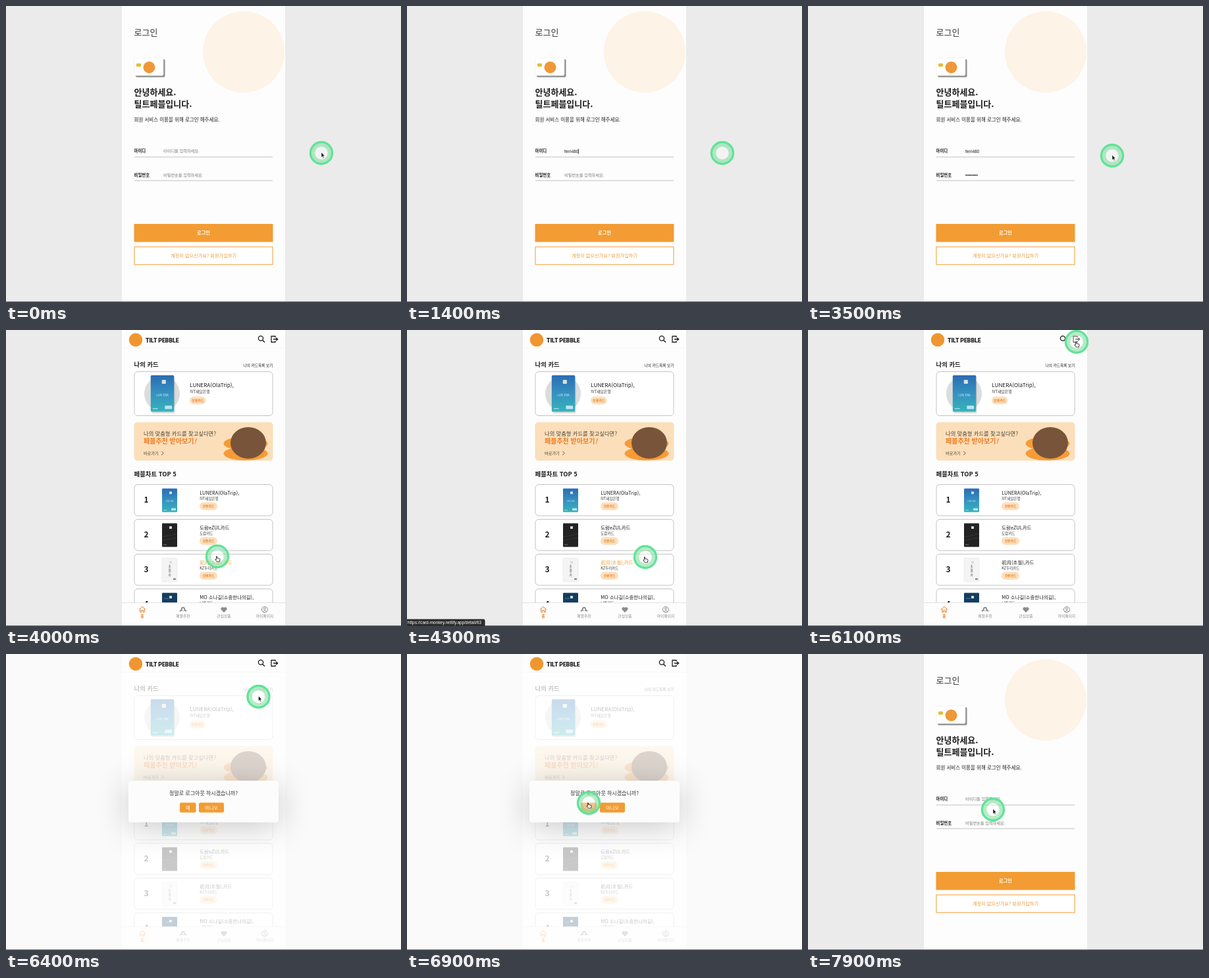
An HTML page that plays this animation: 600 by 451 pixels, repeating every 8 s.

```html
<!DOCTYPE html>
<html lang="ko">
<head>
<meta charset="utf-8">
<style>
html, body { margin: 0; width: 100%; height: 100%; overflow: hidden; background: #ebebeb; }
svg { display: block; width: 600px; height: 451px; }
text { font-family: "Noto Sans CJK KR", "Noto Sans CJK JP", sans-serif; white-space: pre; }
.latin { font-family: "Liberation Sans", sans-serif; }
.brand { font-family: Roboto, sans-serif; }
#modal > rect:first-child { filter: drop-shadow(0 7px 24px rgba(0, 0, 0, .22)); }
</style>
</head>
<body>
<svg id="stage" viewBox="0 0 600 451"></svg>
<script>
const ORANGE = '#f29c33', DEEP = '#f07a20', INK = '#1c1c1c';

const text = (x, y, size, str, fill = INK, weight = 400, more = '') =>
  `<text x="${x}" y="${y}" font-size="${size}" fill="${fill}" font-weight="${weight}" ${more}>${str}</text>`;
const rect = (x, y, w, h, fill, more = '') =>
  `<rect x="${x}" y="${y}" width="${w}" height="${h}" fill="${fill}" ${more}/>`;
const disc = (x, y, r, fill, more = '') =>
  `<circle cx="${x}" cy="${y}" r="${r}" fill="${fill}" ${more}/>`;
const line = (d, stroke, width = 1, more = '') =>
  `<path d="${d}" fill="none" stroke="${stroke}" stroke-width="${width}" ${more}/>`;
const middle = 'text-anchor="middle"';
const frame = (y, h) => rect(195, y, 210, h, '#fff', 'rx="5" stroke="#bdbdbd" stroke-width=".9"');

function login() {
  return disc(361, 70, 62, '#fdf3e6', 'clip-path="url(#column)"') +
    text(194.5, 44.5, 13, '로그인', '#333', 300) +
    rect(197, 81, 44.5, 27.5, '#8d8d8d', 'rx="2"') +
    rect(195, 79, 44, 27, '#fff', 'rx="2" stroke="#eee" stroke-width=".6"') +
    rect(198, 87.5, 7, 5, '#e9b93c', 'rx="1"') +
    disc(217.5, 93.5, 9, '#ef9838') +
    text(194.5, 135.5, 13, '안녕하세요.', INK, 700) +
    text(194.5, 153.5, 13, '틸트페블입니다.', INK, 700) +
    text(194.5, 176, 7.5, '회원 서비스 이용을 위해 로그인 해주세요.', INK, 500) +
    text(194.5, 223.3, 6.4, '아이디', INK, 700) +
    text(194.5, 259.5, 6.4, '비밀번호', INK, 700) +
    text(239, 223.3, 6.2, '아이디를 입력하세요.', '#777', 400, 'id="idHint"') +
    text(239, 259.5, 6.2, '비밀번호를 입력하세요.', '#777', 400, 'id="pwHint"') +
    text(239, 223.6, 6.3, '', INK, 400, 'id="idText" class="latin"') +
    '<g id="dots"></g>' + rect(0, 0, .7, 8, '#111', 'id="caret"') +
    rect(195, 229.6, 210, .9, '#b9b9b9') + rect(195, 265.6, 210, .9, '#b9b9b9') +
    rect(194.5, 332, 211, 27.5, ORANGE) +
    text(300, 348, 7.2, '로그인', '#fff', 700, middle) +
    rect(195, 367, 210, 27, '#fff', `stroke="${ORANGE}"`) +
    text(300, 382.7, 7.2, '계정이 없으신가요? 회원가입하기', ORANGE, 500, middle);
}

// Payment card picture; the unit size is 23 by 36
function card(x, y, k, kind) {
  const g = [
    rect(0, 0, 23, 36, 'url(#sky)', 'rx="1"') +
      text(11.5, 20.5, 3, 'LUN ERA', '#cfeaf5', 400, middle) +
      rect(14, 30, 7, 3.5, '#bfe3ee', 'rx=".5"') + rect(2, 32.5, 5, 1, '#9fd6df'),
    rect(0, 0, 23, 36, '#232323', 'rx="1"') + line('M0 21L23 16M0 26L23 22', '#3a3a3a', .8) +
      rect(2, 32, 5, 1, '#777'),
    rect(0, 0, 23, 36, '#f4f4f4', 'rx="1" stroke="#e2e2e2" stroke-width=".5"') +
      ['초', '월', '카'].map((c, i) => text(11.5, 14 + i * 6.5, 4.6, c, '#444', 400, middle)).join('') +
      rect(17, 31, 4, 2, '#777'),
    rect(0, 0, 23, 36, '#123d61', 'rx="1"') + rect(3, 8, 7, 1, '#4f7d9f')
  ][kind];
  return `<g transform="translate(${x} ${y}) scale(${k})">${g}${rect(11, 4.5, 4, 4, '#d9dfdc', 'rx=".7"')}</g>`;
}

const pill = (x, y, w, size) => rect(x, y, w, 12, '#fbe0bd', 'rx="6"') +
  text(x + w / 2, y + 7.8, size, '신용카드', DEEP, 700, middle);

const rows = [
  ['LUNERA(OlaTrip),', 'IVT새담은행', 20],
  ['도람eZUL카드', '도람카드', 14],
  ['初月(초월),카드', 'KZ두리카드', 63],
  ['MO 소나길(소중한나의길),', '너른카드', 35]
];
const rowTop = i => 235.5 + i * 53;

function row([name, bank], i) {
  const y = rowTop(i);
  return frame(y, 47.5) + text(209.5, y + 27, 12, i + 1, INK, 700) + card(237, y + 6, 1, i) +
    text(294.3, y + 15.5, 7.4, name, INK, 500, 'class="name"') +
    text(294.3, y + 23.6, 5.5, bank, '#333') + pill(294, y + 27, 27, 4.8);
}

function nav() {
  const labels = ['홈', '페블추천', '관심상품', '마이페이지'];
  const grey = '#8c8c8c';
  return rect(176, 415.5, 248, 35, '#fdfdfd') + rect(176, 415, 248, .8, '#ddd') +
    labels.map((s, i) => text(207 + i * 62, 437.6, 5.8, s, i ? grey : DEEP, i ? 400 : 700, middle)).join('') +
    line('M202.5 425.5L207 421.5L211.5 425.5M203.7 425V430H205.7V427H208.3V430H210.3V425', DEEP, 1) +
    line('M264.5 429Q265 426 267 427Q266 423 269 423Q272 423 271 427Q273 426 273.5 429', grey, 1.8) +
    `<path d="M331 430.5L327 426.4A2.5 2.5 0 0 1 331 423.3A2.5 2.5 0 0 1 335 426.4Z" fill="${grey}"/>` +
    disc(393, 426, 4.5, 'none', `stroke="${grey}"`) + disc(393, 424.8, 1.5, 'none', `stroke="${grey}" stroke-width=".9"`) +
    line('M390 429Q393 426.3 396 429', grey, .9);
}

function home() {
  return text(194.5, 55.7, 9.4, '나의 카드', INK, 700) +
    text(405.5, 56, 5.7, '나의 카드목록 보기', INK, 500, 'text-anchor="end"') +
    frame(63.5, 67) + disc(237, 97, 27, '#dcdcdc') + rect(221.5, 71, 35, 56, '#0002', 'rx="1"') +
    card(219.8, 69, 1.54, 0) +
    text(279.3, 86.8, 8.2, rows[0][0], INK, 500) + text(279.3, 96.2, 5.9, rows[0][1], '#333') +
    pill(279, 101.3, 24.5, 5) +
    rect(194.5, 140.5, 211, 58.5, '#fbdfba', 'rx="5"') +
    text(209, 160.8, 8.3, '나의 맞춤형 카드를 찾고싶다면?', '#4a4038') +
    text(209, 173.2, 10, '페블추천 받아보기<tspan font-style="italic">!</tspan>', DEEP, 700) +
    text(209, 190, 6.2, '바로가기', '#4a4038') + line('M236.3 184.8L239.2 187.7L236.3 190.6', '#4a4038', .9) +
    '<g fill="#f69b37"><ellipse cx="364" cy="173" rx="33.5" ry="10.5"/><ellipse cx="364" cy="188.3" rx="33.5" ry="10.5"/></g>' +
    '<ellipse cx="368" cy="172" rx="27" ry="24" fill="#78543a"/>' +
    text(194.5, 222.8, 9.4, '페블차트 TOP 5', INK, 700) +
    rows.map(row).join('') + nav();
}

function header() {
  return rect(176, 0, 248, 27, '#fdfdfd') + rect(176, 27, 248, .6, '#f3f3f3') +
    disc(197, 15, 10.3, '#f09630') +
    text(212, 19, 8.7, 'TILT PEBBLE', INK, 800, 'class="brand"') +
    disc(387, 12.8, 3.6, 'none', `stroke="${INK}" stroke-width="1.3"`) + line('M389.6 15.4L393 18.8', INK, 1.4) +
    line('M409 11.5V9.5H403V18.5H409V16.5M406 14H412.5M410.3 11.7L412.7 14L410.3 16.3', INK, 1.3);
}

function modal() {
  return rect(186, 193, 228, 63.5, '#fcfcfc', 'rx="4"') +
    text(300, 215.2, 8, '정말로 로그아웃 하시겠습니까?', '#333', 400, middle) +
    rect(264, 226.5, 24.5, 15, ORANGE, 'rx="2"') + text(276.2, 236.5, 7.2, '예', '#fff', 400, middle) +
    rect(293, 226.5, 38, 15, ORANGE, 'rx="2"') + text(312, 236.5, 7.2, '아니오', '#fff', 400, middle);
}

function pointer() {
  return disc(0, 0, 10, '#fff', 'opacity=".4"') +
    disc(0, 0, 13, 'none', 'stroke="#94e3b2" stroke-opacity=".68" stroke-width="6.5"') +
    disc(0, 0, 16.6, 'none', 'stroke="#5fe396" stroke-width="3.2"') +
    '<path id="arrow" d="M0 -1V6.6L1.7 5.1L2.9 7.8L4.1 7.2L2.9 4.6H5.2Z" fill="#111" stroke="#fff" stroke-width=".5"/>' +
    '<path id="hand" d="M-1.6 3.6V0Q-1 -1 -.4 0V2.6L3.2 3.2Q4.2 3.6 4 5L3.4 8H-.8L-3.2 4.8Q-3 3.6 -1.6 4.8Z" fill="#fff" stroke="#111" stroke-width=".8"/>';
}

const stage = document.getElementById('stage');
stage.innerHTML = `<defs>
  <linearGradient id="sky" x2="0" y2="1"><stop stop-color="#2a6db3"/><stop offset=".5" stop-color="#3591c0"/><stop offset="1" stop-color="#37b3bb"/></linearGradient>
  <clipPath id="column"><rect x="176" width="248" height="451"/></clipPath></defs>` +
  rect(0, 0, 600, 451, '#ebebeb') + rect(176, 0, 248, 451, '#fdfdfd') +
  `<g id="login">${login()}</g><g id="home">${home()}</g>` +
  rect(0, 0, 600, 451, '#fff', 'id="veil" opacity=".75"') +
  `<g id="head">${header()}</g><g id="modal">${modal()}</g>` +
  rect(0, 450, 600, 1, '#777') +
  `<g id="status"><path d="M0 440.5H116Q118.5 440.5 118.5 443V451H0Z" fill="#2b2b2b"/>` +
  text(1, 448, 6.4, '', '#fff', 400, 'id="url" class="latin"') + '</g>' +
  `<g id="pointer">${pointer()}</g>`;

const el = {};
stage.querySelectorAll('[id]').forEach(n => el[n.id] = n);
const names = stage.querySelectorAll('.name');
const show = (id, on) => { el[id].style.display = on ? '' : 'none'; };

const path = [
  [0, 479, 224], [3400, 479, 224], [3500, 462, 228], [3700, 385, 300], [3900, 320, 344], [4100, 322, 346],
  [4300, 362, 346], [4700, 382, 268], [5000, 410, 150], [5200, 424, 89], [5500, 440, 50], [5800, 418, 22],
  [6100, 408, 18], [6300, 407, 20], [6500, 360, 110], [6700, 290, 215], [6900, 276, 227], [7500, 276, 227],
  [7900, 281, 237], [8000, 281, 237]
];
const idKeys = [600, 700, 900, 1000, 1200, 1300, 1400];
const pwKeys = [2100, 2400, 2500, 2600, 2800, 2900, 3000, 3200];
const pressed = (keys, t) => keys.filter(k => k <= t).length;

function position(t) {
  const i = path.findIndex(p => p[0] > t);
  const [a, b] = [path[i - 1], path[i]];
  const k = (t - a[0]) / (b[0] - a[0]);
  return [a[1] + (b[1] - a[1]) * k, a[2] + (b[2] - a[2]) * k];
}

function form(t) {
  const fresh = t >= 7500;
  const n = fresh ? 0 : pressed(idKeys, t), m = fresh ? 0 : pressed(pwKeys, t);
  el.idText.textContent = 'fern480'.slice(0, n);
  el.dots.innerHTML = Array.from({ length: m }, (_, i) => disc(240.2 + i * 2.35, 257.7, .95, INK)).join('');
  show('idHint', !n);
  show('pwHint', !m);
  show('caret', t >= 400 && t < 3400);
  const onId = t < 1700;
  const end = onId ? (n ? el.idText.getComputedTextLength() : 0) : m * 2.35;
  el.caret.setAttribute('x', 239 + end);
  el.caret.setAttribute('y', onId ? 217.5 : 254);
}

function draw(t) {
  const inside = t >= 4000 && t < 7500, asking = t >= 6300 && t < 7500;
  const [x, y] = position(t);
  show('login', !inside);
  for (const id of ['home', 'head']) show(id, inside);
  for (const id of ['veil', 'modal']) show(id, asking);
  if (!inside) form(t);

  const over = (l, top, r, b) => x > l && x < r && y > top && y < b;
  const hot = inside && !asking
    ? rows.findIndex((_, i) => over(195, rowTop(i), 405, rowTop(i) + 47.5)) : -1;
  names.forEach((n, i) => n.setAttribute('fill', i === hot ? ORANGE : INK));
  show('status', t >= 4200 && t < 5500);
  const near = y > 338 ? 2 : y > 285 ? 1 : 0;
  el.url.textContent = 'https://card-monkey.netlify.app/detail/' + rows[near][2];

  const link = asking ? over(264, 226, 331, 242)
    : inside ? hot >= 0 || over(195, 63, 405, 131) || over(400, 6, 416, 22)
    : over(195, 332, 405, 359);
  const hidden = t >= 600 && t < 3500;
  show('hand', link && !hidden);
  show('arrow', !link && !hidden);
  el.pointer.setAttribute('transform', `translate(${x} ${y})`);
}

const start = performance.now();
(function tick() {
  const t = (performance.now() - start) % 8000;
  draw(Math.floor(t / 100) * 100);
  requestAnimationFrame(tick);
})();
</script>
</body>
</html>
```
